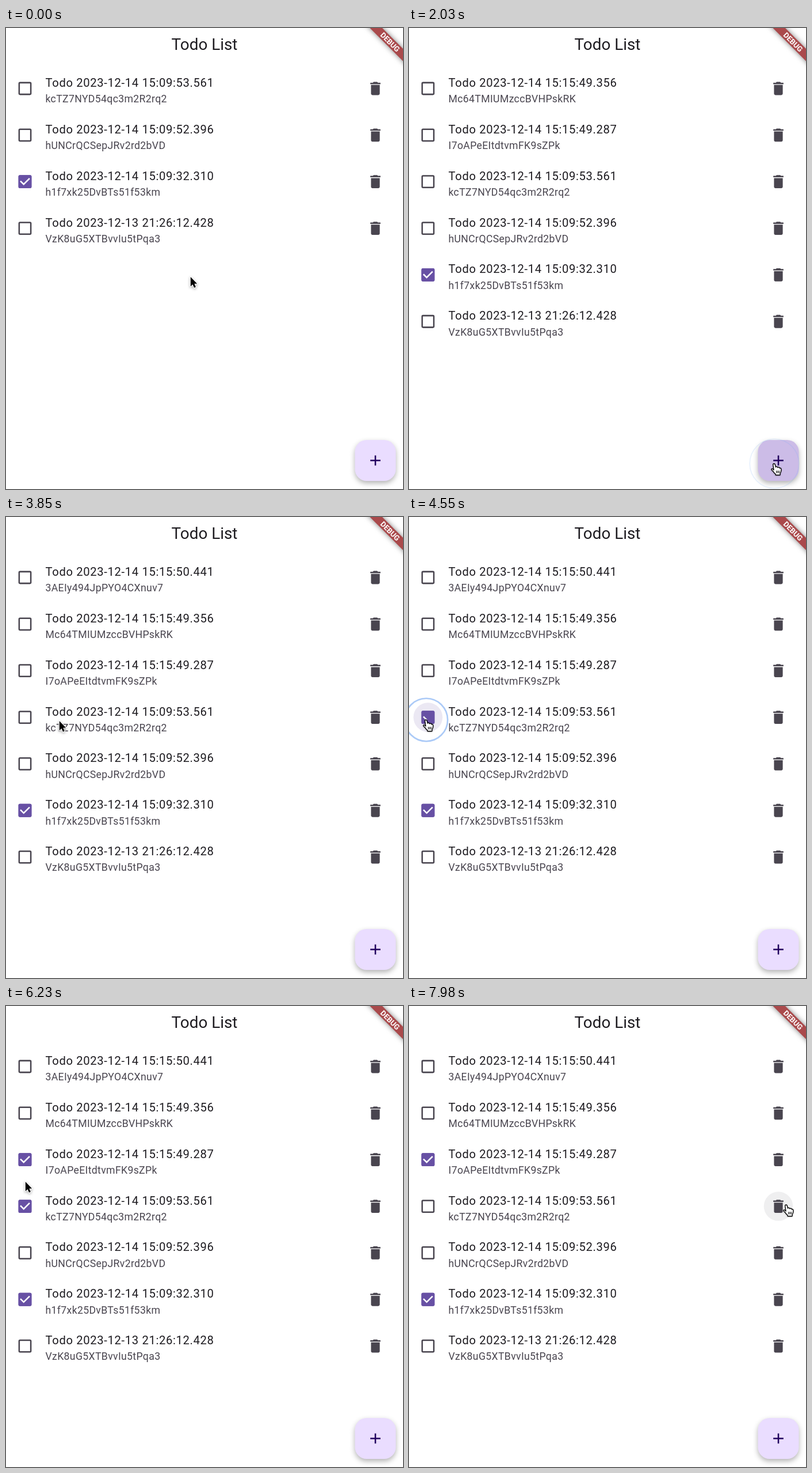
Write an HTML page with a canvas that moves like this. It is 690 px wide and 800 px high and loops after 8000 ms.

```html
<!DOCTYPE html>
<html lang="en">
<head>
<meta charset="utf-8">
<title>Todo List</title>
<style>
html, body { margin: 0; width: 100%; height: 100%; overflow: hidden; background: #fff; }
canvas { display: block; }
</style>
</head>
<body>
<canvas id="stage" width="690" height="800"></canvas>
<script>
const ctx = document.getElementById('stage').getContext('2d');
const LOOP = 8000, STEP = 70, U = 1.265;   // U: pixels per logical unit
const ROW = 80.85, TOP = 105, BOX_X = 33, BIN_X = 642;
const FAB = { x: 606.5, y: 715, size: 71, cx: 642, cy: 750.5 };
const INK = '#49454f', PURPLE = '#6750a4';

// Newest first; born = time it joins the list, on/off = times it is ticked and cleared
const todos = [
  { date: '2023-12-14 15:15:50.441', id: '3AEIy494JpPYO4CXnuv7', born: 3080 },
  { date: '2023-12-14 15:15:49.356', id: 'Mc64TMIUMzccBVHPskRK', born: 1890 },
  { date: '2023-12-14 15:15:49.287', id: 'I7oAPeEItdtvmFK9sZPk', born: 1820, on: 5670 },
  { date: '2023-12-14 15:09:53.561', id: 'kcTZ7NYD54qc3m2R2rq2', on: 4410, off: 6790 },
  { date: '2023-12-14 15:09:52.396', id: 'hUNCrQCSepJRv2rd2bVD' },
  { date: '2023-12-14 15:09:32.310', id: 'h1f7xk25DvBTs51f53km', on: -1000 },
  { date: '2023-12-13 21:26:12.428', id: 'VzK8uG5XTBvvIu5tPqa3' }
];

// Pointer stops: time, x, y
const path = [
  [0, 320, 431], [280, 320, 431], [1190, 635, 756], [3080, 635, 756],
  [3850, 92, 353], [4130, 30, 352], [4550, 30, 352], [4830, 29, 273],
  [5880, 29, 273], [6230, 33, 304], [6440, 31, 352], [6930, 31, 352],
  [7700, 656, 345], [8000, 656, 345]
];
const clicks = [1400, 1610, 2560, 4270, 5530, 6580];

const binIcon = new Path2D('M6 19c0 1.1.9 2 2 2h8c1.1 0 2-.9 2-2V7H6zM19 4h-3.5l-1-1h-5l-1 1H5v2h14z');
const plusIcon = new Path2D('M19 13h-6v6h-2v-6H5v-2h6V5h2v6h6z');
const arrow = new Path2D('M.8 1V17.4L4.5 13.9 7 19.8 9.9 18.6 7.4 12.8H12.2Z');
const hand = new Path2D('M5 12L3.7 3Q3.6 1 5.4 1 6.9 1 7.3 2.8L8.4 7Q8.9 6 10.2 6.2 11.6 6.4 11.9 7.8 12.6 6.8 13.8 7.2 15 7.6 15.2 8.9 16 8.2 17 8.9 18.3 9.8 18 12.2 17.6 15.5 16.2 17.6L16 20.8H8.2L8 19Q5.5 17 4.2 14.8L1.2 11.9Q.4 10.5 1.6 9.8 2.9 9.3 5 12Z');
const knuckles = new Path2D('M9.7 13.2V17.6M12 13.2V17.6M14.3 13.2V17.6');

const ramp = (t, from, span) => Math.max(0, Math.min(1, (t - from) / span));
const smooth = k => k * k * (3 - 2 * k);
const near = (p, x, y, r) => Math.hypot(p.x - x, p.y - y) < r;

function pointerAt(t) {
  const i = Math.max(1, path.findIndex(s => s[0] > t));
  const [t0, x0, y0] = path[i - 1], [t1, x1, y1] = path[i];
  const k = smooth(ramp(t, t0, t1 - t0));
  return { x: x0 + (x1 - x0) * k, y: y0 + (y1 - y0) * k };
}

function text(str, x, y, size, color, spacing = 0, weight = 400) {
  ctx.font = `${weight} ${size * U}px Roboto, sans-serif`;
  ctx.letterSpacing = spacing * U + 'px';
  ctx.fillStyle = color;
  ctx.fillText(str, x, y);
}

function disc(x, y, r, color) {
  ctx.fillStyle = color;
  ctx.beginPath();
  ctx.arc(x, y, r, 0, 7);
  ctx.fill();
}

function icon(shape, x, y, color) {
  ctx.save();
  ctx.translate(x, y);
  ctx.scale(U, U);
  ctx.translate(-12, -12);
  ctx.fillStyle = color;
  ctx.fill(shape);
  ctx.restore();
}

function roundBox(x, y, size, r) {
  ctx.beginPath();
  ctx.roundRect(x, y, size, size, r);
}

function shadow(color, blur, dy = 0) {
  ctx.shadowColor = color;
  ctx.shadowBlur = blur;
  ctx.shadowOffsetY = dy;
}

function checkbox(y, amount, hovered) {
  const size = 18 * U, x = BOX_X - size / 2, top = y - size / 2;
  ctx.lineWidth = 2 * U;
  ctx.strokeStyle = amount ? PURPLE : hovered ? '#1d1b20' : INK;
  roundBox(x + U, top + U, size - 2 * U, 1.5);
  ctx.stroke();
  if (!amount) return;
  ctx.globalAlpha = Math.min(1, amount * 2);
  ctx.fillStyle = PURPLE;
  roundBox(x, top, size, 2.5);
  ctx.fill();
  ctx.globalAlpha = 1;
  const k = ramp(amount, 0.4, 0.6);
  if (!k) return;
  const a = Math.min(1, k * 2), b = Math.max(0, k * 2 - 1);
  ctx.strokeStyle = '#fff';
  ctx.beginPath();
  ctx.moveTo(x + 0.15 * size, top + 0.45 * size);
  ctx.lineTo(x + (0.15 + 0.25 * a) * size, top + (0.45 + 0.25 * a) * size);
  if (b) ctx.lineTo(x + (0.4 + 0.45 * b) * size, top + (0.7 - 0.45 * b) * size);
  ctx.stroke();
}

// Returns whether the pointer is over one of the row's controls
function row(todo, y, t, p) {
  const onBox = near(p, BOX_X, y, 25), onBin = near(p, BIN_X, y, 25);
  const ticked = ramp(t, todo.on ?? 1e9, 200) - ramp(t, todo.off ?? 1e9, 200);
  if (onBox) {
    disc(BOX_X, y, 25.3, ticked ? 'rgba(103,80,164,.09)' : 'rgba(28,27,31,.095)');
    const press = Math.max(...clicks.map(c => t < c ? 0 : 1 - ramp(t, c + 150, 250)));
    if (press) disc(BOX_X, y, 25.3, `rgba(103,80,164,${0.1 * press})`);
  }
  if (onBin) disc(BIN_X, y, 25.3, 'rgba(73,69,79,.085)');
  checkbox(y, ticked, onBox);
  text('Todo ' + todo.date, 68.5, y - 3, 16, '#1d1b20', 0.5);
  text(todo.id, 68.5, y + 24.3, 14, INK, 0.25);
  icon(binIcon, BIN_X, y, INK);
  return onBox || onBin;
}

function addButton(t, p) {
  const { x, y, size } = FAB;
  const over = p.x > x && p.x < x + size && p.y > y && p.y < y + size;
  const press = ramp(t, 1470, 180) - ramp(t, 1960, 250) + ramp(t, 2600, 180) - ramp(t, 3030, 200);
  ctx.save();
  shadow('rgba(0,0,0,.3)', 10, 4);
  ctx.fillStyle = '#eaddff';
  roundBox(x, y, size, 16 * U);
  ctx.fill();
  ctx.restore();
  ctx.fillStyle = `rgba(33,0,93,${(over ? 0.05 : 0) + 0.14 * press})`;
  ctx.fill();
  icon(plusIcon, FAB.cx, FAB.cy, '#21005d');
  return over;
}

function banner() {
  ctx.save();
  ctx.translate(698, -6);
  ctx.rotate(Math.PI / 4);
  shadow('rgba(0,0,0,.5)', 10);
  ctx.fillStyle = '#aa4a4c';
  ctx.fillRect(-40 * U, 28 * U, 80 * U, 12 * U);
  shadow('transparent', 0);
  text('DEBUG', 0, 47.6, 10.2, '#fff', 0, 700);
  ctx.restore();
}

function clickRings(t) {
  for (const c of clicks) {
    const age = t - c;
    if (age < 0 || age > 500) continue;
    const fade = ramp(age, 150, 350), p = pointerAt(c);
    ctx.strokeStyle = `rgba(109,163,241,${(1 - fade) ** 1.2})`;
    ctx.lineWidth = 3.6 - 2.6 * fade;
    ctx.beginPath();
    ctx.arc(p.x, p.y, 22 + 10 * ramp(age, 0, 70) + 14 * fade, 0, 7);
    ctx.stroke();
  }
}

function pointer(p, isHand) {
  ctx.save();
  ctx.lineJoin = 'round';
  ctx.translate(p.x, p.y);
  if (isHand) {
    ctx.translate(-6, -1);
    shadow('rgba(0,0,0,.35)', 3, 1);
    ctx.fillStyle = '#fff';
    ctx.fill(hand);
    shadow('transparent', 0);
    ctx.strokeStyle = '#000';
    ctx.lineWidth = 1.4;
    ctx.stroke(hand);
    ctx.lineWidth = 1.1;
    ctx.stroke(knuckles);
  } else {
    shadow('rgba(0,0,0,.35)', 4, 1.5);
    ctx.strokeStyle = '#fff';
    ctx.lineWidth = 2.4;
    ctx.stroke(arrow);
    shadow('transparent', 0);
    ctx.fillStyle = '#000';
    ctx.fill(arrow);
  }
  ctx.restore();
}

function draw(now) {
  const t = Math.floor((now % LOOP) / STEP) * STEP;
  const p = pointerAt(t);
  ctx.fillStyle = '#fff';
  ctx.fillRect(0, 0, 690, 800);

  ctx.textAlign = 'center';
  text('Todo List', 345, 38, 22, '#1d1b20');
  banner();

  ctx.textAlign = 'left';
  let over = false;
  todos.filter(d => t >= (d.born ?? 0)).forEach((d, i) => {
    over = row(d, TOP + i * ROW, t, p) || over;
  });
  over = addButton(t, p) || over;
  clickRings(t);
  pointer(p, over);
  requestAnimationFrame(draw);
}
requestAnimationFrame(draw);
</script>
</body>
</html>
```
